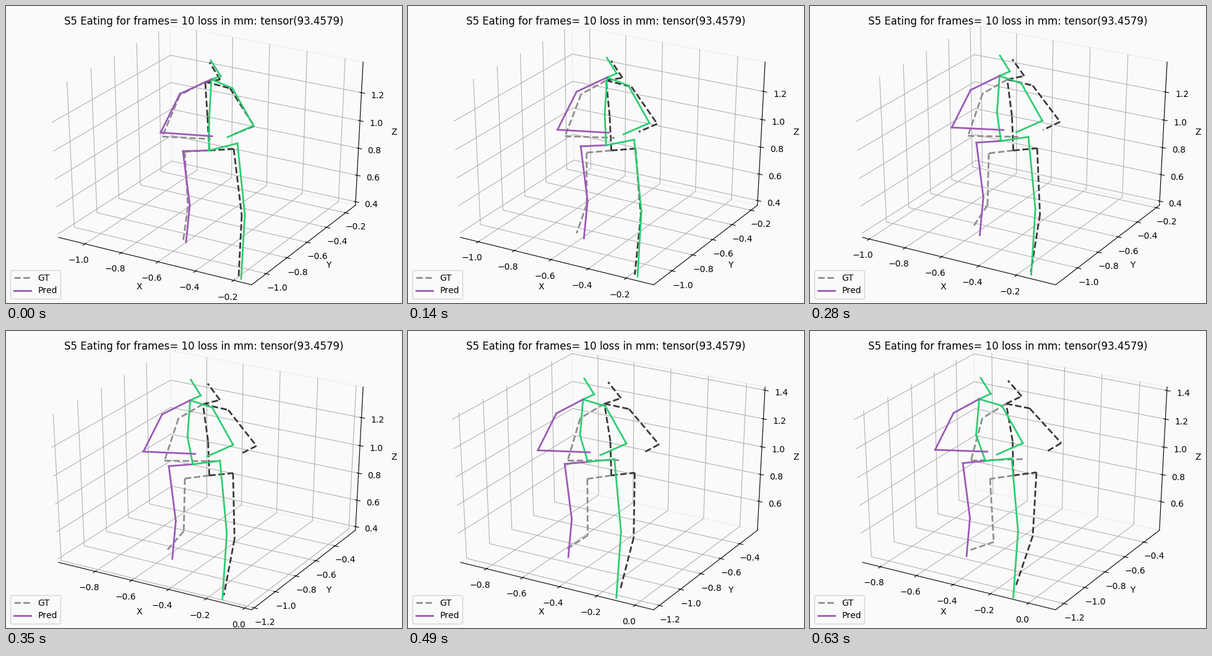
Recreate the animation shown at these times as a matplotlib script. Size 640 by 480 pixels, loop 700 ms.

```python
import math

import numpy as np
import matplotlib.pyplot as plt
from matplotlib.animation import FuncAnimation
from matplotlib.lines import Line2D

W, H, N = 640, 480, 10
BG, GRID = "#fafafa", "#b0b0b0"
GT_RIGHT, GT_LEFT = "#8e8e8e", "#383838"
PRED_RIGHT, PRED_LEFT = "#9b59b6", "#2ecc71"
EDGE = 0.5 + 1 / 48      # axes box, slightly larger than the limits
TICK_PAD = EDGE + 0.057
LABEL_PAD = EDGE + 0.124

# Centre of the view volume: a cubic path through four points
ROOT_KEYS = [(-.628, -.615, .894), (-.549, -.669, .886),
             (-.4535, -.718, .898), (-.380, -.755, .904)]
ROOT = np.polyfit(np.linspace(0, 1, 4), ROOT_KEYS, 3)

AZ, EL = math.radians(-60), math.radians(30)
RIGHT = np.array([-math.sin(AZ), math.cos(AZ), 0])
UP = np.array([-math.cos(AZ) * math.sin(EL), -math.sin(AZ) * math.sin(EL),
               math.cos(EL)])
TOWARD = np.cross(RIGHT, UP)


class Limb:
    """Joints with a start place, a total drift and an arc on the way.

    Drift and arc are given at a few joints and spread along the limb.
    """

    def __init__(self, start, drift, arc=((0, 0),)):
        self.start = np.array(start, float)
        self.drift = self.spread(drift)
        self.arc = self.spread(arc)

    def spread(self, keys):
        u = np.linspace(0, 1, len(self.start))
        v = np.linspace(0, 1, len(keys))
        return np.column_stack([np.interp(u, v, c) for c in zip(*keys)])

    def at(self, s, pace):
        return self.start + self.drift * pace(s) + self.arc * 4 * s * (1 - s)


GT = {
    "hip": Limb([(328.6, 233.5)], [(0, 0)]),
    "rleg": Limb([(289, 235.5), (294, 324), (286, 382)],
                 [(2, 3.5), (3, 17), (-27, -28)],
                 [(-1, 1), (-8.5, -10), (-11, -12)]),
    "lleg": Limb([(368, 231), (381, 338), (376, 437)],
                 [(-2, -2.5), (-21, -7), (-43, -26)], [(0, 0), (0, 4.5)]),
    "trunk": Limb([(325.5, 178), (322, 122.5)], [(2, 0), (-5, -5)],
                  [(0, 0), (-1, -1.5)]),
    "head": Limb([(346, 119), (329, 91)], [(-4, -13.5), (-9, -11)], [(2, 0)]),
    "larm": Limb([(362, 133), (401, 194), (369, 207)],
                 [(-7, -8), (5, -13), (15, -13)], [(1, -1)]),
    "rarm": Limb([(281, 144), (252.5, 211), (331, 215)],
                 [(-2.5, -3), (7.5, -1.5), (13, -8)], [(-1, -1), (0, 0)]),
}
PRED = {
    "hip": Limb([(328, 233.5)], [(-44.5, -23.5)]),
    "rleg": Limb([(286, 234.5), (297, 322), (291, 382)],
                 [(-39, -21), (-38, -18)]),
    "lleg": Limb([(374, 222), (386, 337), (380, 441)],
                 [(-48, -16), (-51.5, -10.5)]),
    "trunk": Limb([(328.5, 180), (332, 118.5)], [(-60, -12), (-58.5, -8.5)]),
    "head": Limb([(347, 113.5), (331, 88)], [(-55, -12)]),
    "larm": Limb([(366, 133), (400, 193.5), (358, 212)], [(-56, -12.3)]),
    "rarm": Limb([(281, 142), (250, 204.5), (333, 210.5)],
                 [(-49, -9.5), (-46.5, -15.5)]),
}


def steady(s):
    return np.array([s, s])


def settle(s):
    """Sideways: slow-fast-slow. Upwards: ease out."""
    side = s - 0.055 * math.sin(2 * math.pi * s) + 0.012 * math.sin(math.pi * s)
    return np.array([side, 1 - (1 - s) ** 1.8])


def project(p):
    """Centred box coordinates to pixels, perspective from distance 10."""
    p = np.asarray(p, float)
    depth = 10 - p @ TOWARD
    x = (p @ RIGHT / depth + 0.095) / 0.185 * W
    y = H - (p @ UP / depth + 0.095) / 0.185 * H
    return x, y


def path(points, color, lw=0.8, **kw):
    ax.plot(*project(points), color=color, lw=lw, **kw)


def at(axis, value, others):
    """Point with `value` on one axis and `others` on the remaining two."""
    return np.insert(np.array(others, float), axis, value)


# Per axis: grid corners, axis edge, tick direction (all in the other two axes)
AXES = [
    ("X", [(-1, -1), (1, -1), (1, 1)], (-1, -1), (-1, 0)),
    ("Y", [(-1, 1), (-1, -1), (1, -1)], (1, -1), (1, 0)),
    ("Z", [(1, 1), (-1, 1), (-1, -1)], (1, 1), (1, 0)),
]


def draw_axes(root):
    e = EDGE
    path([(-e, e, -e), (-e, e, e), (e, e, e), (e, e, -e), (-e, e, -e)],
         "#ececec", zorder=1)
    for k, (name, corners, edge, tick) in enumerate(AXES):
        edge, tick = np.array(edge), np.array(tick)
        lo = math.ceil((root[k] - 0.5) / 0.2)
        hi = math.floor((root[k] + 0.5) / 0.2)
        for n in range(lo, hi + 1):
            s = n * 0.2 - root[k]
            path([at(k, s, np.array(c) * e) for c in corners], GRID,
                 zorder=1.2)
            path([at(k, s, edge * e - tick * 0.1 / 12),
                  at(k, s, edge * e + tick * 0.2 / 12)], "black", zorder=1.6)
            ax.text(*project(at(k, s, edge * TICK_PAD)),
                    f"{n * 0.2:.1f}".replace("-", "\u2212"),
                    size=10, ha="center", va="top")
        path([at(k, -e, edge * e), at(k, e, edge * e)], "black", zorder=1.5)
        ax.text(*project(at(k, 0, edge * LABEL_PAD)), name,
                size=10, ha="center", va="center")


def draw_skeleton(body, s, pace, left, right, style):
    pose = {name: limb.at(s, pace) for name, limb in body.items()}
    hip, thorax = pose.pop("hip")[0], pose["trunk"][-1]
    for name, joints in pose.items():
        root = hip if name in ("rleg", "lleg", "trunk") else thorax
        chain = np.vstack([root, joints])
        for a, b in zip(chain, chain[1:]):
            ax.plot((a[0], b[0]), (a[1], b[1]), lw=2, ls=style,
                    color=right if name[0] == "r" else left)


def update(i):
    s = i / (N - 1)
    ax.clear()
    ax.set(xlim=(0, W), ylim=(H, 0))
    ax.axis("off")
    draw_axes(s ** np.arange(3, -1, -1) @ ROOT)
    draw_skeleton(GT, s, steady, GT_LEFT, GT_RIGHT, "--")
    draw_skeleton(PRED, s, settle, PRED_LEFT, PRED_RIGHT, "-")
    ax.text(W / 2, 30, "S5 Eating for frames= 10 loss in mm: tensor(93.4579)",
            size=12, ha="center", va="baseline")
    ax.legend(handles=[Line2D([], [], color=GT_RIGHT, lw=2, ls="--", label="GT"),
                       Line2D([], [], color=PRED_RIGHT, lw=2, label="Pred")],
              loc="lower left", facecolor=BG)
    return []


plt.rcParams.update({"font.family": "DejaVu Sans", "text.kerning_factor": 6})
fig = plt.figure(figsize=(W / 100, H / 100), dpi=100, facecolor=BG)
ax = fig.add_axes([0, 0, 1, 1])
anim = FuncAnimation(fig, update, frames=N, init_func=lambda: [],
                     interval=70, repeat=True, repeat_delay=0)
plt.show()
```
